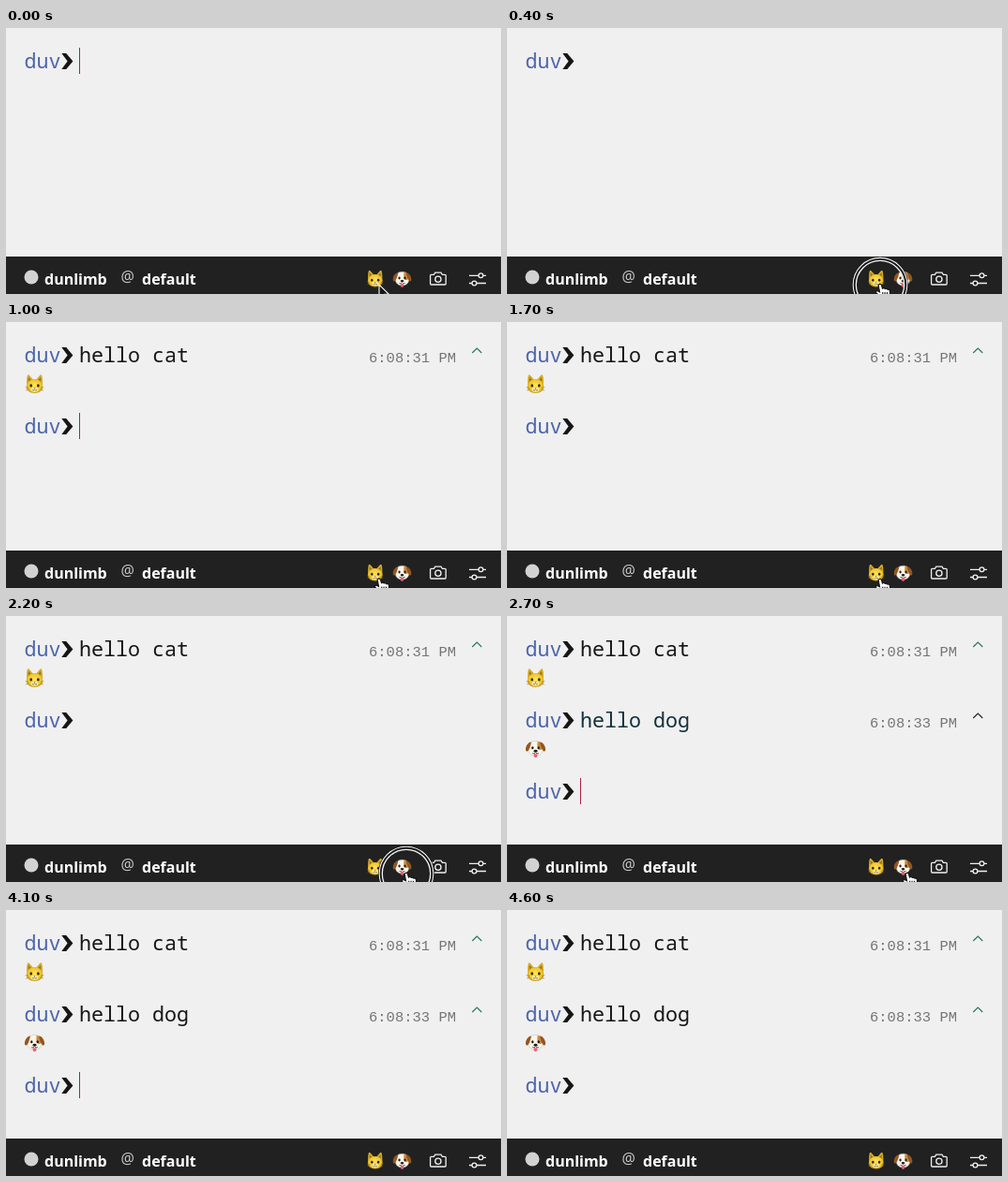
An HTML page that plays this animation: 528x284 px, repeating every 4700 ms.

```html
<!DOCTYPE html>
<html lang="en">
<head>
<meta charset="utf-8">
<title>Terminal greeting</title>
<style>
  html, body { margin: 0; width: 100%; height: 100%; overflow: hidden; background: #f0f0f0; }
  svg { display: block; width: 100vw; height: 100vh; }
  text { white-space: pre; }
  .mono { font: 400 21.7px "Noto Sans Mono", "Liberation Mono", monospace; fill: #161616; }
  .name { fill: #4c65ab; }
  .time { font: 400 15.5px "Liberation Mono", monospace; fill: #757575; }
  .label { font: 700 16px "Noto Sans", "Open Sans", sans-serif; fill: #fff; }
  .at { font: 400 16px "Noto Sans", "Open Sans", sans-serif; fill: #c8c8c8; }
  .fold { fill: none; stroke: #2c7a58; stroke-width: 1.2; }
  .icon { fill: none; stroke: #f0f0f0; stroke-width: 1.3; }
  .fresh .command { fill: #12303c; }
  .fresh .fold { stroke: #262626; }
</style>
</head>
<body>
<svg viewBox="0 0 528 284">
  <defs>
    <radialGradient id="fur" cx="50%" cy="45%" r="60%">
      <stop offset="0" stop-color="#ffe55c"/>
      <stop offset=".65" stop-color="#efc62f"/>
      <stop offset="1" stop-color="#b98f17"/>
    </radialGradient>
    <symbol id="cat" viewBox="0 0 20 20">
      <path d="M1.9 12 Q1.4 4 2.6 .8 Q3.2 -.2 4.4 .8 L8.2 5.2 H11.8 L15.6 .8 Q16.8 -.2 17.4 .8 Q18.6 4 18.1 12Z" fill="#d6ac26"/>
      <path d="M3.5 2.6 L6.4 5.8 3.4 8.6Z M16.5 2.6 L13.6 5.8 16.6 8.6Z" fill="#94742a"/>
      <path d="M10 4.8 C15.6 4.8 18.7 8.8 18.5 13 C18.2 17.3 14.5 19.4 10 19.4 S1.8 17.3 1.5 13 C1.3 8.8 4.4 4.8 10 4.8Z" fill="url(#fur)"/>
      <ellipse cx="6.3" cy="11.6" rx="1.3" ry="1.6" fill="#30270f"/>
      <ellipse cx="13.7" cy="11.6" rx="1.3" ry="1.6" fill="#30270f"/>
      <ellipse cx="10" cy="15.8" rx="3.8" ry="2.4" fill="#fbeca0"/>
      <path d="M8.9 13.8 H11.1 L10 15Z" fill="#a5604a"/>
      <path d="M7.6 16.2 Q8.9 17.3 10 15.6 Q11.1 17.3 12.4 16.2" fill="none" stroke="#5f4718" stroke-width=".7"/>
      <path d="M.4 13.4 L3.6 14.2 M.8 16.6 L3.9 15.8 M19.6 13.4 L16.4 14.2 M19.2 16.6 L16.1 15.8" stroke="#806121" stroke-width=".5"/>
    </symbol>
    <symbol id="dog" viewBox="0 0 22 19">
      <path d="M11 .7 C16 .7 18.6 4 18.8 8.6 C19 13.6 15.6 16.6 11 16.6 S3 13.6 3.2 8.6 C3.4 4 6 .7 11 .7Z" fill="#faf5ec" stroke="#c5b7a4" stroke-width=".5"/>
      <path d="M13.2 1.1 C17 1.9 18.5 5 18.6 8.6 Q16.6 11.4 14 9.6 Q12.2 7.6 13.2 1.1Z" fill="#c98a3c"/>
      <path d="M6.4 1.8 C2.8 2 .5 6.2.4 9.6 C.4 12.4 2.4 12.3 3.5 10.4 C5 8 6 5 6.4 1.8Z" fill="#95561f"/>
      <path d="M15.6 1.8 C19.2 2 21.5 6.2 21.6 9.6 C21.6 12.4 19.6 12.3 18.5 10.4 C17 8 16 5 15.6 1.8Z" fill="#95561f"/>
      <ellipse cx="7.8" cy="8" rx="1.2" ry="1.6" fill="#231a15"/>
      <ellipse cx="14.2" cy="8" rx="1.2" ry="1.6" fill="#231a15"/>
      <path d="M9.2 14.4 H12.8 V16.6 Q12.6 18.6 11 18.6 T9.2 16.6Z" fill="#df6577"/>
      <ellipse cx="11" cy="11.4" rx="2" ry="1.3" fill="#241c1b"/>
      <path d="M7.6 13.8 Q9.8 15.2 11 12.8 Q12.2 15.2 14.4 13.8" fill="none" stroke="#47362d" stroke-width=".8"/>
    </symbol>
  </defs>

  <rect width="528" height="284" fill="#f0f0f0"/>
  <g id="rows"></g>

  <rect y="244" width="528" height="40" fill="#212121"/>
  <circle cx="27" cy="266" r="7.5" fill="#d2d2d2"/>
  <text class="label" x="41" y="274">dunlimb</text>
  <text class="at" x="122.5" y="270.5">@</text>
  <text class="label" x="145" y="274">default</text>
  <use href="#cat" x="384.5" y="258.5" width="18.5" height="18.5"/>
  <use href="#dog" x="412.3" y="259.5" width="20.5" height="17.7"/>
  <g class="icon">
    <path d="M453.6 263.3 H456.4 L457.8 261.2 H464 L465.4 263.3 H468.2 Q469.2 263.3 469.2 264.3 V273 Q469.2 274 468.2 274 H453.6 Q452.6 274 452.6 273 V264.3 Q452.6 263.3 453.6 263.3Z"/>
    <circle cx="460.9" cy="268.3" r="3.1"/>
    <path d="M494 264.3 H504 M509 264.3 H512 M494 272.5 H497 M502 272.5 H512"/>
    <circle cx="506.5" cy="264.3" r="2.4"/>
    <circle cx="499.5" cy="272.5" r="2.4"/>
  </g>

  <g id="pointer">
    <g id="ring" fill="none">
      <circle r="27.6" stroke="#151515" stroke-width="4.6"/>
      <circle r="28.8" stroke="#f4f4f4" stroke-width="1.1"/>
      <circle r="25.7" stroke="#f4f4f4" stroke-width="1.3"/>
    </g>
    <path id="arrow" d="M0 0 V14.5 L3.4 11.3 L5.7 16.5 L8.2 15.4 L6 10.4 H10.5Z" fill="#151515" stroke="#fff" stroke-width="1.1"/>
    <path id="hand" transform="translate(0 -1) scale(1.1)" d="M-1.7 1.2 Q0 -.8 1.3 1.2 L2.2 4.6 Q3.8 3.5 4.8 4.9 Q6.3 4.1 7.2 5.6 Q9.3 5 9.5 7.3 Q9.8 10.5 7.9 14 H.6 Q-.6 11.4 -3.7 9 Q-4.8 7.2 -2.8 6.8 L-.4 8Z M2.5 8 V11 M4.6 8 V11 M6.7 8 V11" fill="#fff" stroke="#111" stroke-width="1"/>
  </g>
</svg>
<script>
const LOOP = 4700, STEP = 100, ROW = 76;
const CAT_SHOWN = 700, DOG_SHOWN = 2600;
const $ = id => document.getElementById(id);

const turns = [
  { pet: 'cat', time: '6:08:31 PM', from: 0, done: CAT_SHOWN },
  { pet: 'dog', time: '6:08:33 PM', from: CAT_SHOWN, done: DOG_SHOWN },
  { from: DOG_SHOWN, done: LOOP }
];
const caretOn = [[0, 200], [800, 1300], [1800, 2100], [2700, 3200], [3700, 4200]];

// [time, x, y] of the pointer's hot spot
const path = [
  [0, 398, 274], [1700, 398, 275], [2100, 427, 275],
  [3600, 427, 275], [3900, 432, 300], [LOOP, 432, 300]
];
// [time, opacity] of the click ring
const press = [
  [0, 0], [100, 0], [400, 1], [600, 1], [700, 0],
  [1900, 0], [2200, 1], [2500, 1], [2600, 0], [LOOP, 0]
];

$('rows').innerHTML = turns.map(({ pet, time }, i) => `
  <g class="row" transform="translate(0 ${i * ROW})">
    <text class="mono name" x="19.5" y="43">duv</text>
    <path d="M59.3 27 H64.2 L71.4 35.5 L64.2 44 H59.3 L65.6 35.5Z" fill="#161616"/>
    <rect class="caret" x="78" y="21" width="1" height="28" fill="#a9213e"/>
    ${pet ? `<g class="reply">
      <text class="mono command" x="78" y="43">hello ${pet}</text>
      <text class="time" x="480" y="43" text-anchor="end">${time}</text>
      <path class="fold" d="M497.3 33 L502.3 28 L507.3 33"/>
      <use href="#${pet}" x="19.5" y="56" width="22" height="20.5"/>
    </g>` : ''}
  </g>`).join('');

const rows = [...document.querySelectorAll('.row')];
const show = (el, on) => el && el.setAttribute('visibility', on ? 'visible' : 'hidden');
const ease = u => u * u * (3 - 2 * u);

function sample(keys, t, curve = u => u) {
  const i = keys.findIndex(k => k[0] > t);
  const a = keys[i - 1], b = keys[i];
  const u = curve((t - a[0]) / (b[0] - a[0]));
  return a.slice(1).map((v, n) => v + (b[n + 1] - v) * u);
}

function draw(t) {
  const blink = caretOn.some(([a, b]) => t >= a && t < b);
  rows.forEach((row, i) => {
    const { from, done } = turns[i];
    row.style.display = t >= from ? '' : 'none';
    row.classList.toggle('fresh', t >= done && t < done + 300);
    show(row.querySelector('.reply'), t >= done);
    show(row.querySelector('.caret'), t >= from && t < done && blink);
  });
  const [x, y] = sample(path, t, ease);
  $('pointer').setAttribute('transform', `translate(${x} ${y})`);
  $('ring').setAttribute('opacity', sample(press, t)[0]);
  show($('arrow'), t < 100);
  show($('hand'), t >= 100);
}

const start = performance.now();
function tick() {
  const t = (performance.now() - start) % LOOP;
  draw(Math.floor(t / STEP) * STEP);
  requestAnimationFrame(tick);
}
tick();
</script>
</body>
</html>
```
